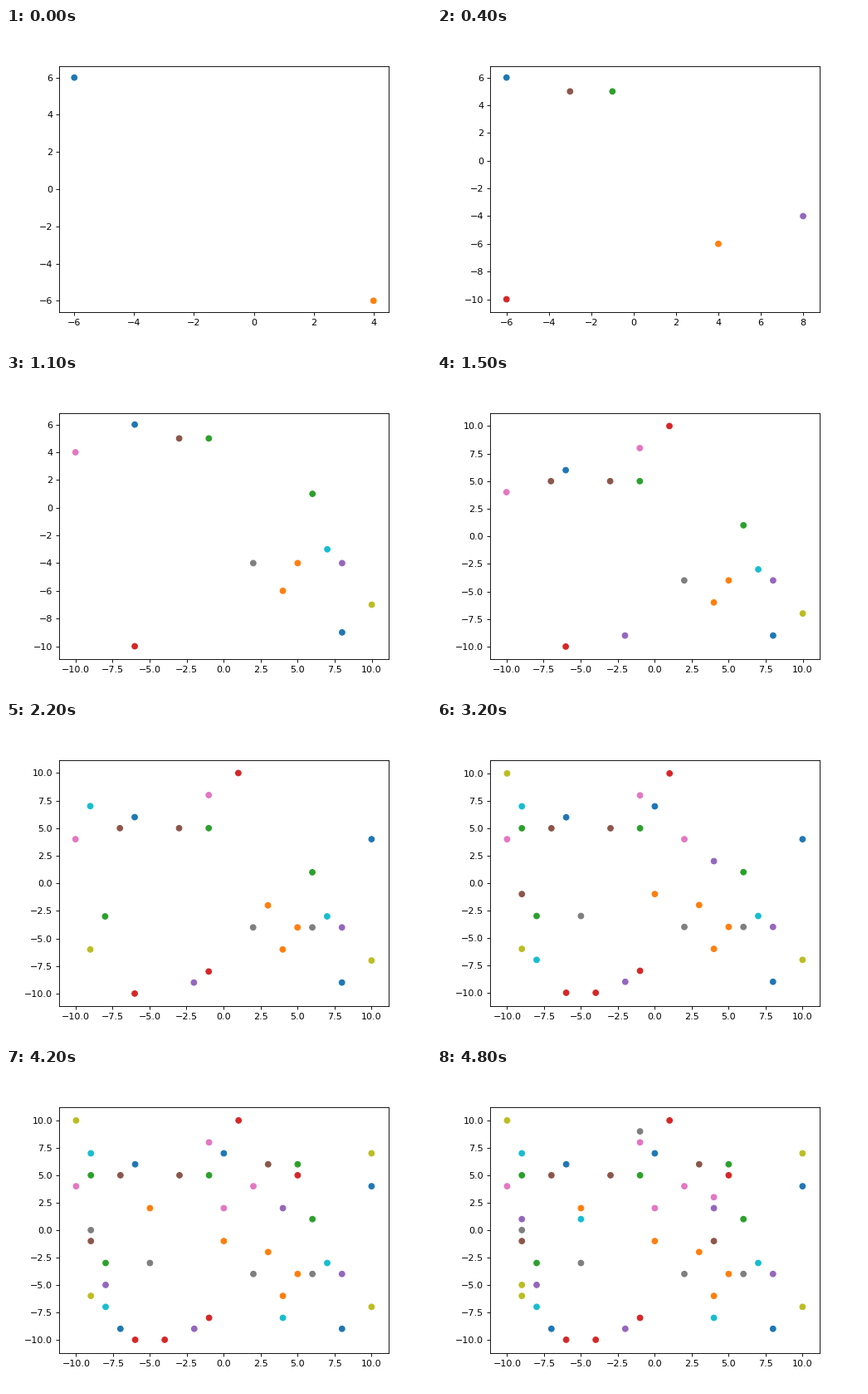
A matplotlib script for the animation above (4900 ms loop, 512 by 384 pixels).

```python
import random
from itertools import product

import numpy as np
import matplotlib.pyplot as plt
from matplotlib.animation import FuncAnimation

FRAMES = 49
TOTAL = FRAMES + 1
SPAN = range(-10, 11)
MARKER_RADIUS = 2.4  # pixels of room each marker claims in the limits
MARGIN = 0.05

# Opening points, which set how the axes grow
OPENING = [
    (-6, 6), (4, -6), (-1, 5), (-6, -10), (8, -4), (-3, 5), (-10, 4),
    (2, -4), (10, -7), (7, -3), (8, -9), (5, -4), (6, 1), (1, 10),
]


def make_points():
    """The opening, then random free grid cells."""
    free = [cell for cell in product(SPAN, SPAN) if cell not in OPENING]
    rng = random.Random(7)
    return np.array(OPENING + rng.sample(free, TOTAL - len(OPENING)))


def running_limits(values, pixels):
    """Axis limits after each point, padded by marker size and margin."""
    low, high = np.inf, -np.inf
    view = (0.0, 1.0)
    limits = []
    for v in values:
        r = MARKER_RADIUS * (view[1] - view[0]) / pixels
        low, high = min(low, v - r), max(high, v + r)
        pad = MARGIN * (high - low)
        view = (low - pad, high + pad)
        limits.append(view)
    return limits


fig, ax = plt.subplots(figsize=(6.4, 4.8), dpi=80)
fig.subplots_adjust(left=0.125, right=0.9, bottom=0.11, top=0.88)
dots = ax.scatter([], [], s=36)

points = make_points()
colors = [f"C{i % 10}" for i in range(TOTAL)]
x_limits = running_limits(points[:, 0], ax.bbox.width)
y_limits = running_limits(points[:, 1], ax.bbox.height)


def update(frame):
    count = frame + 2
    dots.set_offsets(points[:count])
    dots.set_color(colors[:count])
    ax.set_xlim(x_limits[count - 1])
    ax.set_ylim(y_limits[count - 1])
    return dots,


anim = FuncAnimation(fig, update, frames=FRAMES, interval=100,
                     repeat=True, repeat_delay=0, blit=False)
plt.show()
```
